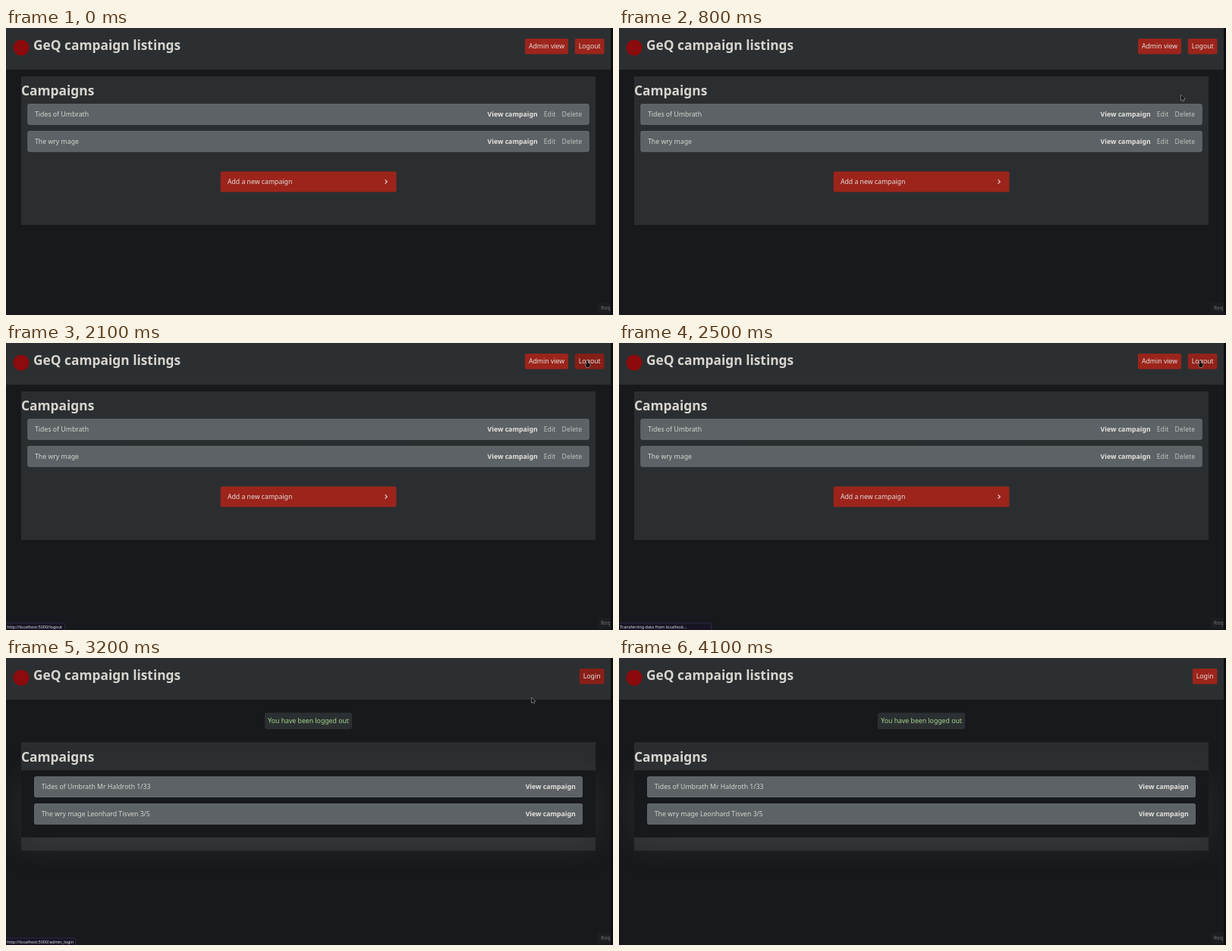
Write an HTML page with a canvas that moves like this. It is 800 by 379 pixels and loops after 4.9 s.

```html
<!DOCTYPE html>
<html lang="en">
<head>
<meta charset="utf-8">
<title>Campaign listings</title>
<style>
  html, body { margin: 0; width: 100%; height: 100%; overflow: hidden; background: #18191c; }
  canvas { display: block; width: 800px; height: 379px; }
</style>
</head>
<body>
<canvas></canvas>
<script>
const LOOP = 4900, STEP = 100, LOGGED_OUT = 2600;
const SMALL = 8.73, LARGE = 17.35;
const RED = '#9c241b', LIGHT = '#d8d5d0', PANEL = '#2b2e30', PAGE = '#18191c';
const canvas = document.querySelector('canvas');
const ctx = canvas.getContext('2d');
const ratio = window.devicePixelRatio || 1;
canvas.width = 800 * ratio;
canvas.height = 379 * ratio;
ctx.scale(ratio, ratio);

const ramp = (t, start, length) => Math.min(1, Math.max(0, (t - start) / length));
const easeOut = (u, power) => 1 - (1 - u) ** power;

// Point on a quadratic curve from a to b, pulled towards c.
function curve(u, a, c, b) {
  return a.map((v, i) => (1 - u) ** 2 * v + 2 * u * (1 - u) * c[i] + u * u * b[i]);
}

function pointerAt(t) {
  const start = [28, 33], side = [603, 210], top = [766, 23], rest = [686, 131], exit = [3, 305];
  if (t < 600) return curve(ramp(t, 100, 500), start, [316, 500], side);
  if (t < 2900) return curve(easeOut(ramp(t, 600, 600), 3), side, [740, 141], top);
  if (t < 3700) return curve(easeOut(ramp(t, 2900, 800), 2), top, [674, 0], rest);
  return curve(ramp(t, 3700, 300), rest, [345, 235], exit);
}

function box(x, y, w, h, fill, radius = 0, stroke) {
  ctx.beginPath();
  ctx.roundRect(x, y, w, h, radius);
  ctx.fillStyle = fill;
  ctx.fill();
  if (!stroke) return;
  ctx.beginPath();
  ctx.roundRect(x + 0.4, y + 0.4, w - 0.8, h - 0.8, radius);
  ctx.strokeStyle = stroke;
  ctx.lineWidth = 0.8;
  ctx.stroke();
}

function text(str, x, y, color = LIGHT, weight = 400, size = SMALL) {
  ctx.font = `${weight} ${size}px "Noto Sans", sans-serif`;
  ctx.fillStyle = color;
  ctx.fillText(str, x, y);
}

const heading = (str, x, y) => text(str, x, y, LIGHT, 700, LARGE);

function button(label, x, w, hover = 0) {
  box(x, 14, w, 20.5, RED, 2);
  box(x, 14, w, 20.5, `rgba(0, 0, 0, ${0.17 * hover})`, 2);
  text(label, x + 4.9, 27.3, '#e3dfda');
}

function rows(x, top, w, names, links) {
  names.forEach((name, i) => {
    const y = top + i * 35.7;
    box(x, y, w, 27.4, '#5c6265', 2, '#686f72');
    text(name, x + 9.5, y + 16.8);
    links(y + 16.8);
  });
}

function header() {
  box(0, 0, 800, 379, PAGE);
  box(0, 0, 797, 55, '#2c2f31');
  box(9.5, 15.5, 21, 21, '#8c0b0d', 10.5);
  heading('GeQ campaign listings', 36, 28.6);
}

function adminPage(t) {
  button('Admin view', 684, 57);
  button('Logout', 749.8, 38.7, ramp(t, 1100, 300) - 0.6 * ramp(t, 2000, 400));
  box(20, 64, 757, 196, PANEL);
  heading('Campaigns', 20, 89);
  rows(28.5, 100.3, 740, ['Tides of Umbrath', 'The wry mage'], y => {
    text('View campaign', 634.6, y, '#e6e3df', 700);
    text('Edit', 708.7, y, '#c4c3c0');
    text('Delete', 732.6, y, '#c4c3c0');
  });
  box(282.7, 189.6, 231.8, 26.8, RED, 2);
  text('Add a new campaign', 291.9, 206.3, '#e3dfda');
  ctx.beginPath();
  ctx.moveTo(499.6, 200.4);
  ctx.lineTo(502.2, 203);
  ctx.lineTo(499.6, 205.6);
  ctx.strokeStyle = '#e3dfda';
  ctx.lineWidth = 1.1;
  ctx.stroke();
}

function publicPage(t) {
  button('Login', 755.8, 32.7, ramp(t, 2600, 300) - ramp(t, 3100, 400));
  box(341, 72.3, 115, 21.6, '#2c2f31', 3);
  text('You have been logged out', 345.2, 86.4, '#a5d68c');
  box(20, 111.3, 757, 143.2, PANEL);
  ctx.save();
  ctx.shadowColor = 'rgba(85, 92, 96, 0.27)';
  ctx.shadowBlur = 40 * ratio;
  ctx.shadowOffsetY = 9 * ratio;
  box(20, 148.3, 757, 88.7, PAGE, 2);
  ctx.restore();
  heading('Campaigns', 20, 136.6);
  const names = ['Tides of Umbrath Mr Haldroth 1/33', 'The wry mage Leonhard Tisven 3/5'];
  rows(37.2, 156.6, 722.6, names, y => text('View campaign', 684.7, y, '#e6e3df', 700));
}

function status(str, w) {
  box(-1, 369.5, w + 1, 11, '#171524', 1, '#353052');
  text(str, 1.2, 376.6, '#dedde6', 400, 5.54);
}

function pointer(t) {
  const isHand = t >= 1100 && t < 3000;
  const shape = new Path2D(isHand
    ? 'M-.8 .3Q0-.6 .8 .3V3.2L3.6 4V6.8L2.8 9H-.8L-2.6 5.6L-1.7 4.8L-.8 5.6Z'
    : 'M0 0V6.8L1.6 5.4L2.8 8L4 7.4L2.9 5H5Z');
  ctx.save();
  ctx.translate(...pointerAt(t));
  ctx.strokeStyle = '#d6d6d6';
  ctx.lineWidth = 0.9;
  ctx.stroke(shape);
  ctx.fillStyle = '#0b0b0c';
  ctx.fill(shape);
  ctx.restore();
}

function draw(now) {
  const t = Math.floor(now % LOOP / STEP) * STEP;
  header();
  if (t < LOGGED_OUT) adminPage(t);
  else publicPage(t);

  box(780, 363, 17, 14, '#1d1e21');
  text('Req', 784, 372.3, '#55585b', 700, 6.5);
  box(797, 0, 3, 379, '#0d0e10');

  if (t >= 1600 && t < 2400) status('http://localhost:5000/logout', 78);
  else if (t >= 2400 && t < LOGGED_OUT) status('Transferring data from localhost...', 122);
  else if (t >= 2700 && t < 3300) status('http://localhost:5000/admin_login', 92);

  if (t >= 100 && t <= 4000) pointer(t);
  requestAnimationFrame(draw);
}

requestAnimationFrame(draw);
</script>
</body>
</html>
```
